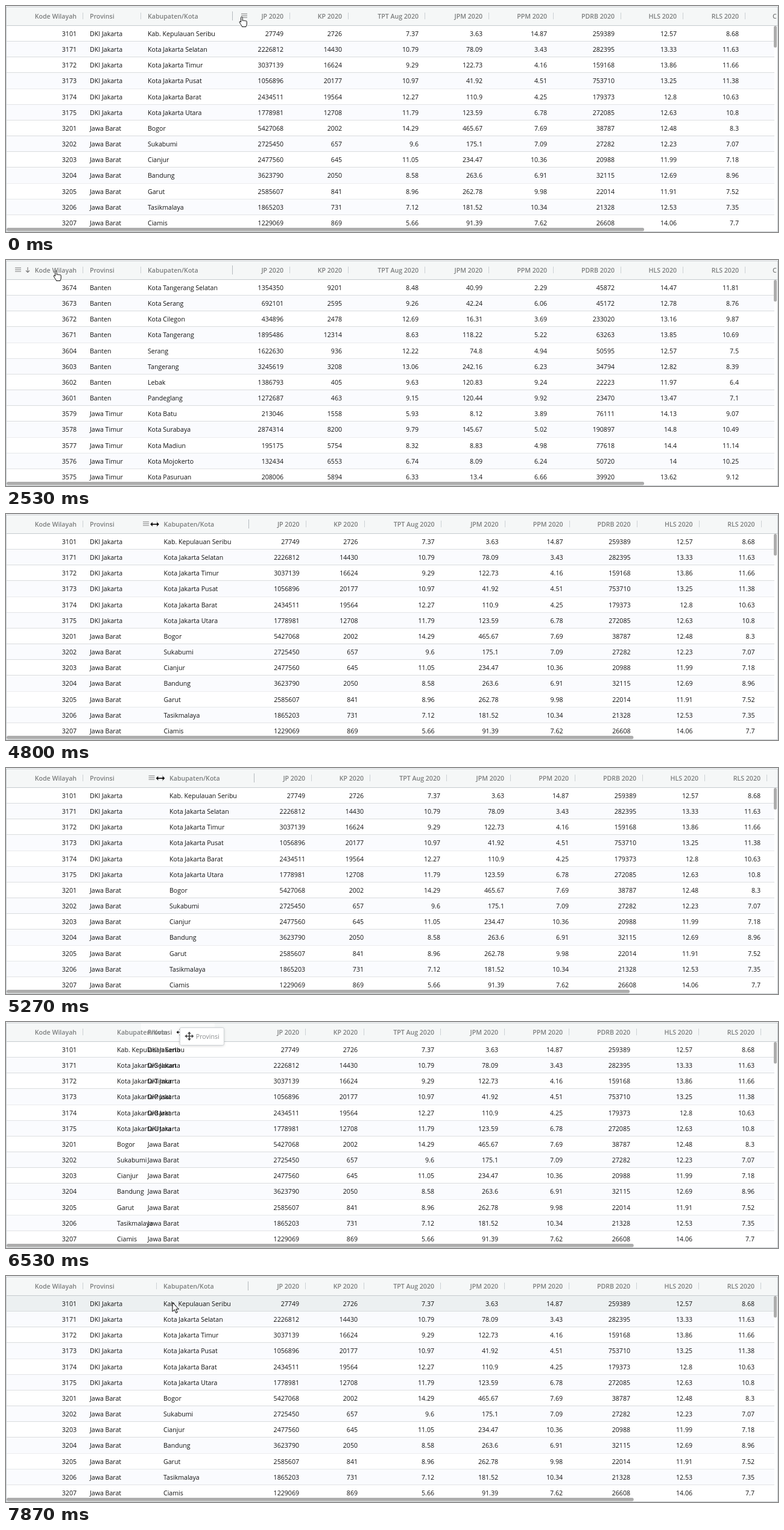
These frames come from a looping animation (1280 by 375 pixels, 8 s). An HTML page with a canvas:

```html
<!DOCTYPE html>
<html lang="id">
<head>
<meta charset="utf-8">
<title>Tabel data</title>
<style>
  html, body { margin: 0; width: 100%; height: 100%; overflow: hidden; background: #fff; }
  canvas { display: block; }
</style>
</head>
<body>
<canvas id="grid" width="1280" height="375"></canvas>
<script>
const ctx = document.getElementById('grid').getContext('2d');
const LOOP = 8000, ROW_TOP = 33, ROW_HEIGHT = 26.15, PADDING = 11;
const FONT = '10.6px "Open Sans", "Noto Sans", sans-serif';

const provinces = { 31: 'DKI Jakarta', 32: 'Jawa Barat', 35: 'Jawa Timur', 36: 'Banten' };
const parse = text => text.trim().split('\n').map(line => {
  const [code, ...rest] = line.split('|');
  return [code, provinces[code.slice(0, 2)], ...rest];
});

const ascending = parse(`
3101|Kab. Kepulauan Seribu|27749|2726|7.37|3.63|14.87|259389|12.57|8.68
3171|Kota Jakarta Selatan|2226812|14430|10.79|78.09|3.43|282395|13.33|11.63
3172|Kota Jakarta Timur|3037139|16624|9.29|122.73|4.16|159168|13.86|11.66
3173|Kota Jakarta Pusat|1056896|20177|10.97|41.92|4.51|753710|13.25|11.38
3174|Kota Jakarta Barat|2434511|19564|12.27|110.9|4.25|179373|12.8|10.63
3175|Kota Jakarta Utara|1778981|12708|11.79|123.59|6.78|272085|12.63|10.8
3201|Bogor|5427068|2002|14.29|465.67|7.69|38787|12.48|8.3
3202|Sukabumi|2725450|657|9.6|175.1|7.09|27282|12.23|7.07
3203|Cianjur|2477560|645|11.05|234.47|10.36|20988|11.99|7.18
3204|Bandung|3623790|2050|8.58|263.6|6.91|32115|12.69|8.96
3205|Garut|2585607|841|8.96|262.78|9.98|22014|11.91|7.52
3206|Tasikmalaya|1865203|731|7.12|181.52|10.34|21328|12.53|7.35
3207|Ciamis|1229069|869|5.66|91.39|7.62|26608|14.06|7.7`);

const descending = parse(`
3674|Kota Tangerang Selatan|1354350|9201|8.48|40.99|2.29|45872|14.47|11.81
3673|Kota Serang|692101|2595|9.26|42.24|6.06|45172|12.78|8.76
3672|Kota Cilegon|434896|2478|12.69|16.31|3.69|233020|13.16|9.87
3671|Kota Tangerang|1895486|12314|8.63|118.22|5.22|63263|13.85|10.69
3604|Serang|1622630|936|12.22|74.8|4.94|50595|12.57|7.5
3603|Tangerang|3245619|3208|13.06|242.16|6.23|34794|12.82|8.39
3602|Lebak|1386793|405|9.63|120.83|9.24|22223|11.97|6.4
3601|Pandeglang|1272687|463|9.15|120.44|9.92|23470|13.47|7.1
3579|Kota Batu|213046|1558|5.93|8.12|3.89|76111|14.13|9.07
3578|Kota Surabaya|2874314|8200|9.79|145.67|5.02|190897|14.8|10.49
3577|Kota Madiun|195175|5754|8.32|8.83|4.98|77618|14.4|11.14
3576|Kota Mojokerto|132434|6553|6.74|8.09|6.24|50720|14|10.25
3575|Kota Pasuruan|208006|5894|6.33|13.4|6.66|39920|13.62|9.12`);

const titles = ['Kode Wilayah', 'Provinsi', 'Kabupaten/Kota', 'JP 2020', 'KP 2020', 'TPT Aug 2020',
  'JPM 2020', 'PPM 2020', 'PDRB 2020', 'HLS 2020', 'RLS 2020'];
const edges = [1, 128, 224, 376, 471, 568, 695, 801, 908, 1020, 1123, 1226];
const CODE = 0, PROVINCE = 1, REGENCY = 2, POPULATION = 3;
const isText = col => col === PROVINCE || col === REGENCY;

// Pointer hot spot: time, x, y
const pointerPath = [
  [0, 391, 18], [70, 391, 18], [530, 83, 18], [3130, 83, 18], [3420, 236, 18], [3670, 225, 18],
  [3800, 220, 17], [4270, 220, 17], [5070, 256, 17], [5270, 256, 17], [5800, 246, 17],
  [6070, 216, 15], [6270, 216, 15], [6560, 292, 17], [6780, 292, 17], [7070, 231, 19],
  [7330, 200, 18], [7470, 200, 18], [7870, 276, 44], [8000, 276, 44]];

// Header hover: column, start, end
const hovers = [
  [POPULATION, -300, 120], [REGENCY, 120, 330], [PROVINCE, 330, 440], [CODE, 440, 3220],
  [PROVINCE, 3220, 6270], [REGENCY, 3400, 3530], [PROVINCE, 7330, 7560], [REGENCY, 7560, 7640]];

const clamp = v => Math.max(0, Math.min(1, v));
const ease = v => { v = clamp(v); return v * v * (3 - 2 * v); };
const mix = (a, b, v) => a + (b - a) * v;

function pointerAt(t) {
  const i = pointerPath.findIndex(key => key[0] > t);
  const [t0, x0, y0] = pointerPath[i - 1], [t1, x1, y1] = pointerPath[i];
  const v = ease((t - t0) / (t1 - t0));
  return { x: mix(x0, x1, v), y: mix(y0, y1, v) };
}

function rect(x, y, w, h, color) {
  ctx.fillStyle = color;
  ctx.fillRect(x, y, w, h);
}

function pill(x, y, w, h, color, radius = 2.5) {
  ctx.fillStyle = color;
  ctx.beginPath();
  ctx.roundRect(x, y, w, h, radius);
  ctx.fill();
}

function text(value, x, y, align, color, weight = 400) {
  ctx.font = `${weight} ${FONT}`;
  ctx.textAlign = align;
  ctx.fillStyle = color;
  ctx.fillText(value, x, y);
}

function shape(path, x, y, fill, stroke, width = 1) {
  ctx.save();
  ctx.translate(x, y);
  ctx.lineWidth = width;
  ctx.lineJoin = 'round';
  if (fill) { ctx.fillStyle = fill; ctx.fill(path); }
  if (stroke) { ctx.strokeStyle = stroke; ctx.stroke(path); }
  ctx.restore();
}

const hand = new Path2D('M-1.5 9V1.3a1.3 1.3 0 0 1 2.6 0V6.5a1.3 1.3 0 0 1 2.5.3a1.3 1.3 0 0 1 2.4.4' +
  'a1.2 1.2 0 0 1 2.2.7V12q0 2-1.2 3.2V16.5H.2V15.2Q-2 12.5-3.8 9.2q-.5-1.4.6-1.6q1-.1 1.7 1.4Z');
const arrow = new Path2D('M0 0V15L3.4 11.8L5.9 17.4L8.2 16.4L5.8 11H10.5Z');
const resize = new Path2D('M-7.5 0L-3.5-4V-1H3.5V-4L7.5 0L3.5 4V1H-3.5V4Z');
const move = new Path2D('M0-7.5L3-4H.8V-.8H4V-3L7.5 0L4 3V.8H.8V4H3L0 7.5L-3 4H-.8V.8H-4V3L-7.5 0L-4-3V-.8H-.8V-4H-3Z');
const sortUp = new Path2D('M0 4.5V-4M-3-1L0-4L3-1');
const sortDown = new Path2D('M0-4.5V4M-3 1L0 4L3 1');

function menuIcon(x, alpha) {
  for (const y of [13, 16, 19]) rect(x - 5, y - .5, 10, 1, `rgba(0,0,0,${.5 * alpha})`);
}

function drawPointer(t, { x, y }) {
  if (t >= 3740 && t < 5900) shape(resize, x, y, '#000', '#fff', .4);
  else if (t >= 6290 && t < 7330) shape(move, x, y, '#000', '#fff', .4);
  else if (y > 32) shape(arrow, x, y, '#fff', '#000');
  else shape(hand, x, y, '#fff', '#111');
}

function drawGhost({ x, y }) {
  ctx.save();
  ctx.shadowColor = 'rgba(0,0,0,.2)';
  ctx.shadowBlur = 4;
  ctx.shadowOffsetY = 1;
  pill(x - 1.5, y - 7.5, 73, 29, '#fff', 2);
  ctx.restore();
  ctx.strokeStyle = '#d0d4d7';
  ctx.lineWidth = 1;
  ctx.stroke();
  shape(move, x + 14, y + 6.5, '#444');
  text('Provinsi', x + 25, y + 11, 'left', '#8a8c8d');
}

function draw(t) {
  const pointer = pointerAt(t);
  const growth = t < 4270 ? 0 : t < 5800 ? pointer.x - 220 : 26;
  const swap = ease((t - 6350) / 308) - ease((t - 6830) / 308);
  const dragging = t >= 6290 && t < 7330;
  const rows = t >= 1690 && t < 2590 ? descending : ascending;

  const columns = titles.map((title, i) => ({
    title,
    left: edges[i] + (i > PROVINCE ? growth : 0),
    right: edges[i + 1] + (i >= PROVINCE ? growth : 0)
  }));
  const provinceWidth = columns[PROVINCE].right - columns[PROVINCE].left;
  const regencyWidth = columns[REGENCY].right - columns[REGENCY].left;
  const shift = (col, dx) => { col.left += dx; col.right += dx; };
  shift(columns[PROVINCE], regencyWidth * swap);
  shift(columns[REGENCY], -provinceWidth * swap);

  const label = (value, i, baseline, color, weight) => isText(i)
    ? text(value, columns[i].left + PADDING, baseline, 'left', color, weight)
    : text(value, columns[i].right - PADDING, baseline, 'right', color, weight);

  rect(0, 0, 1280, 375, '#fff');

  rows.forEach((row, r) => {
    const top = ROW_TOP + r * ROW_HEIGHT;
    const hovered = r === 0 && pointer.y > 33;
    rect(1, top, 1273, ROW_HEIGHT, hovered ? '#ecf0f1' : r % 2 ? '#fafbfe' : '#fff');
    rect(1, Math.round(top + ROW_HEIGHT) - 1, 1273, 1, '#d9dcde');
    row.forEach((value, i) => label(value, i, Math.round(top + 13) + 4, '#111'));
  });

  rect(0, 1, 1280, 31, '#f5f7f7');
  if (dragging) rect(columns[PROVINCE].left, 2, provinceWidth, 30, '#fbfcfc');
  columns.forEach(({ title, right }, i) => {
    label(title, i, 21, '#7b7d7d', 600);
    if (i === REGENCY) rect(Math.round(right) - 1, 9, 1, 15, '#b4babe');
    else rect(Math.round(right) - 1, 11, 1, 11, '#ccd1d4');
  });
  text('C', 1271 + growth, 21, 'left', '#7b7d7d', 600);

  for (const [i, start, end] of hovers) {
    const alpha = clamp(Math.min((t - start) / 200, 1 + (end - t) / 200));
    if (alpha) menuIcon(isText(i) ? columns[i].right - 18.5 : columns[i].left + 19, alpha);
  }
  if (t >= 790 && t < 2590) shape(t < 1690 ? sortUp : sortDown, 36, 16.5, null, '#777', 1.1);

  rect(0, 32, 1280, 1, '#c6cbce');
  rect(1274, 33, 5, 341, '#fff');
  rect(1, 368, 1278, 6, '#fff');
  pill(1273, 33, 5, 36, '#adadad');
  pill(1, 368, 1057 - growth * 2 / 3, 5.5, '#adadad');
  ctx.strokeStyle = '#c6cbce';
  ctx.lineWidth = 1;
  ctx.strokeRect(.5, 1.5, 1279, 373);

  drawPointer(t, pointer);
  if (dragging) drawGhost(pointer);
}

const startTime = performance.now();
function tick() {
  draw((performance.now() - startTime) % LOOP);
  requestAnimationFrame(tick);
}
tick();
</script>
</body>
</html>
```
